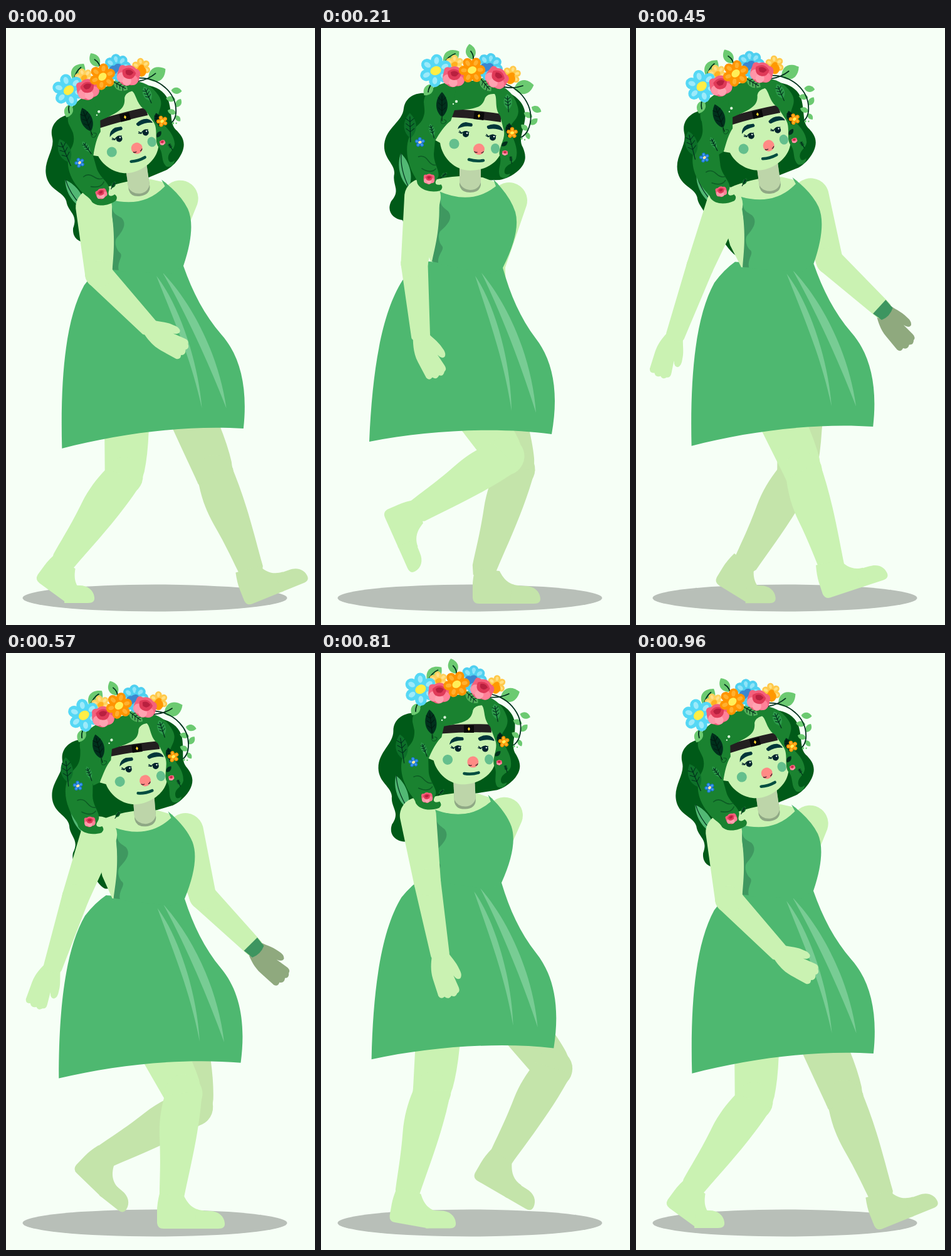
These frames come from a looping animation (493x951 px, 990 ms). An HTML page:

```html
<!DOCTYPE html>
<html lang="en">
<head>
<meta charset="utf-8">
<title>Walking girl</title>
<style>
html, body { margin: 0; width: 100%; height: 100%; overflow: hidden; background: #f6fff6; }
svg { display: block; width: 493px; height: 951px; }
</style>
</head>
<body>
<svg id="stage" viewBox="0 0 493 951"></svg>
<script>
const SKIN = '#caf2b2', FAR_SKIN = '#c4e4aa', DRESS = '#4eb870', SHADE = '#3f9860';
const HAIR = '#1a8230', DEEP = '#005a18', INK = '#00301c', LEAF = '#6cca71';

// ---- shape helpers ----
const path = (d, fill, more = '') => `<path d="${d}" fill="${fill}" ${more}/>`;
const line = (d, color, w) => path(d, 'none', `stroke="${color}" stroke-width="${w}" stroke-linecap="round"`);
const oval = (x, y, rx, ry, fill, a = 0) =>
  `<ellipse cx="${x}" cy="${y}" rx="${rx}" ry="${ry}" fill="${fill}" transform="rotate(${a} ${x} ${y})"/>`;
const dot = (x, y, r, fill) => oval(x, y, r, r, fill);
const at = (x, y, a, body) => `<g transform="translate(${x} ${y}) rotate(${a})">${body}</g>`;
const group = (id, body) => `<g id="${id}">${body}</g>`;

function leaf(x, y, len, a, fill, vein, fat = 0.36) {
  const w = len * fat;
  let s = path(`M0 0C${-w} ${-len * .25} ${-w} ${-len * .7} 0 ${-len}C${w} ${-len * .7} ${w} ${-len * .25} 0 0Z`, fill);
  if (vein) {
    s += line(`M0 ${len * .15}V${-len * .85}`, vein, 1.2);
    for (const k of [.25, .45, .65])
      s += line(`M${-w * .5} ${-len * (k + .13)}L0 ${-len * k}L${w * .5} ${-len * (k + .13)}`, vein, 1);
  }
  return at(x, y, a, s);
}

function flower(x, y, r, n, fill, light, core, a = 0) {
  let s = dot(0, 0, r * .5, fill);
  for (let i = 0; i < n; i++)
    s += at(0, 0, a + i * 360 / n, oval(0, -r * .63, r * .36, r * .38, fill) + oval(0, -r * .62, r * .15, r * .22, light));
  return at(x, y, 0, s + oval(0, 0, r * .34, r * .27, core, -20));
}

const rose = (x, y, r, a) => at(x, y, a, `<g transform="scale(${r / 18})">` +
  path('M-17 -6Q-18 -16 -8 -14Q0 -20 9 -14Q19 -14 18 -3Q20 12 6 14Q-2 19 -9 14Q-20 10 -17 -6Z', '#f4607c') +
  dot(-9, 5, 8, '#ff96a8') + dot(9, 5, 8, '#ff8198') + dot(0, 9, 7, '#ffa3b2') +
  path('M-11 -7Q0 -18 11 -7Q10 5 0 5Q-10 5 -11 -7Z', '#e03a58') +
  path('M-6 -7Q0 -12 7 -7Q4 0 0 -1Q-5 0 -6 -7Z', '#b9203f') + '</g>');

const limb = (len, a, b, fill) =>
  path(`M${-a} 0A${a} ${a} 0 0 1 ${a} 0L${b} ${len}A${b} ${b * .5} 0 0 1 ${-b} ${len}Z`, fill);

// ---- body parts ----
const UPPER = 107, FORE = 117;
const HAND = 'M-13 -2C-18 8 -23 20 -23 34L-23 62Q-21 69 -14 66Q-10 73 -3 68Q2 73 7 67Q13 66 12 58' +
  'L10 38Q13 48 19 46Q24 42 22 32C21 18 14 8 13 -2Z';

const arm = (id, hand, band = '') =>
  group(id + 'Hand', path(HAND, hand)) +
  group(id + 'Fore', limb(FORE, 21.5, 15, SKIN) + at(0, FORE, 0, band)) +
  group(id + 'Upper', limb(UPPER, 29, 21.5, SKIN) + dot(0, UPPER, 21.5, SKIN));

const leg = (id, fill) =>
  group(id + 'Thigh', path('M-30 -5L-27 -62L-22 -150L56 -150L44 -69Q40 -30 33 -5L28 8L-26 8Z', fill) + dot(0, 0, 30.5, fill)) +
  group(id + 'Shin', path('M-30 3C-36 25 -39 45 -38 70C-36 110 -38 140 -38 163L-34 178L-8 178L1 165C10 120 26 60 30 -5Z', fill)) +
  group(id + 'Heel', path('M-60 -56Q-64 -40 -64 -28L-64 -9Q-63 0 -54 0L0 0L10 -29C-8 -30 -16 -42 -21 -52Z', fill)) +
  group(id + 'Toe', path('M-4 0L34 0Q45 0 44 -9C43 -20 34 -28 20 -28L-2 -29Z', fill));

const skirt =
  path('M192 374L165 371Q147 382 130 402C98 452 82 540 77 659C170 641 280 635 368 647' +
    'C380 580 370 530 343 495C318 462 302 425 290 382L240 350Z', DRESS) +
  path('M246 395C277 440 303 530 304 610C292 530 270 470 246 395Z', '#78cc94') +
  path('M256 390C302 445 337 530 343 613C320 540 290 460 256 390Z', '#78cc94');

const torso =
  path('M145 262Q160 240 222 236L258 238L282 247L290 300L200 374L175 372L162 335L156 290Z', SKIN) +
  path('M221 200H255V250Q253 262 238 262Q223 262 221 250Z', '#8fa885') +
  path('M221 200H255V246Q251 258 238 258Q225 257 221 246Z', '#bdd5a9') +
  path('M275 241Q302 268 310 293Q319 325 290 382L270 392L178 374Q190 335 189 300L188 260Q240 283 279 252Z', DRESS) +
  path('M189 262C192 285 191 282 203 292C212 304 200 315 190 324C186 330 188 342 193 347' +
    'C198 353 186 360 187 374L177 372C184 340 190 320 189 262Z', SHADE);

const backHair = path('M182 108C160 98 135 106 132 128C130 150 104 158 101 185C99 208 118 216 117 232' +
  'C113 250 128 258 112 276C104 292 115 304 130 306C136 320 140 345 152 345C165 345 185 300 200 245' +
  'L285 242C295 240 305 236 316 226C330 212 326 200 322 190C314 176 324 165 326 140C326 120 310 105 290 100Z', DEEP) +
  leaf(140, 254, 56, -13, '#52b874', '', .2) + line('M140 254Q126 225 128 200', INK, 1.2);

const eye = (x, y) => oval(x, y, 5, 5, '#00242c') + dot(x + 2, y - 1.5, 1.2, '#fff') +
  line(`M${x + 5} ${y - 3}Q${x - 3} ${y - 6} ${x - 7} ${y - 1}L${x - 11} ${y - 3}M${x - 7} ${y - 2}L${x - 10} ${y - 5}`, '#00242c', 1.3);

const face =
  path('M181 178L190 183C193 206 213 227 238 227C264 227 284 213 288 195L296 160L278 98L215 110L200 145Z', SKIN) +
  dot(212.5, 184.5, 8, '#64bf8d') + oval(278, 192, 7, 8, '#64bf8d') +
  path('M218 161Q221 151 231 150L241 152Q243 156 240 157Q227 155 218 161Z', '#00363a') +
  eye(231, 169) + eye(274, 174.5) +
  dot(252, 193, 9, '#ff8a85') +
  line('M245 197Q247 199 249 198M256 199Q258 199 259 197', '#4a2a30', 1.5) +
  line('M236 209.5Q247 213 259 211', '#004d40', 4.5) +
  path('M211 129Q250 131 288 137L287 150Q248 144 207 142Z', '#231f20') +
  at(252, 140, 7, '<rect x="-8" y="-6" width="16" height="12" fill="#080808"/>' + path('M0 -3L2 0L0 3L-2 0Z', '#ffd92e'));

const cap = path('M164 118C165 95 195 82 240 84C285 82 308 100 314 126C319 146 300 150 302 162' +
  'C306 178 316 190 311 208C306 218 296 216 293 226Q291 236 302 232Q296 243 286 237C280 225 290 215 285 203' +
  'C282 192 294 178 292 165L286 140C276 128 282 112 277 105Q266 104 262 111C258 125 250 128 228 130' +
  'L213 131L207 148C198 154 190 166 181 178L170 180Z', HAIR) +
  path('M265 156Q275 151 284 155Q290 159 290 164Q280 159 267 161Q264 159 265 156Z', '#00363a');

const trim =
  leaf(193, 142, 40, 0, INK, '#001a10', .3) +
  line('M193 140Q188 155 197 152Q203 148 196 146', '#0c5c24', 1.2) +
  leaf(299, 130, 25, -4, '#2c9a4a', INK) + leaf(298, 170, 19, 8, INK, '#001a10') +
  leaf(288, 188, 12, 55, INK) + leaf(304, 214, 11, -10, HAIR, INK) +
  flower(305, 167, 9, 5, '#ff9800', '#ffb338', '#ffee58') + rose(293.5, 199, 4.5, 0) +
  dot(216, 117, 2.2, '#d8f5d8') + dot(211, 121, 1.2, '#d8f5d8') +
  leaf(192, 238, 12, 50, HAIR, INK);

const lock = path('M172 108C160 120 172 140 152 155C134 170 132 195 138 215C142 232 150 238 150 246' +
  'C155 258 172 262 186 259Q192 255 188 249C180 251 176 247 182 240C190 230 175 215 178 197' +
  'L180 180C188 166 197 155 206 147L210 131L215 100Z', HAIR) +
  leaf(141, 174, 40, 0, '#0d7029', INK, .32) +
  leaf(178, 172, 21, -14, '#2c9a4a', INK, .28) +
  line('M153 204Q162 201 168 210T181 218M158 223Q172 232 180 224', '#0c5c24', 1.6) +
  flower(156, 181, 8, 5, '#1e78d8', '#4ba4f0', '#ffe9a0') + rose(169, 240, 9, 0);

const crown =
  leaf(195, 55, 31, 55, LEAF, '', .46) + leaf(241, 50, 25, -10, LEAF, '', .42) +
  leaf(308, 97, 32, 79, LEAF, '', .46) + leaf(178, 90, 22, -142, LEAF, '', .42) +
  leaf(336, 126, 17, 115, LEAF, '', .4) + leaf(337, 142, 15, -62, LEAF, '', .4) +
  leaf(334, 154, 15, 50, LEAF, '', .4) + leaf(330, 163, 14, -50, LEAF, '', .4) +
  leaf(328, 166, 12, 160, LEAF, '', .4) +
  line('M196 56Q204 44 214 41M241 56Q246 46 239 37M180 86Q172 92 171 102M292 94Q308 97 322 92', INK, 1.8) +
  line('M290 88C324 98 344 132 330 163Q326 171 318 175', INK, 1.8) +
  dot(320, 176, 1.8, LEAF) + dot(325, 178, 1.2, LEAF) +
  leaf(254, 80, 27, 140, '#4eae58', INK, .38) +
  flower(213, 58, 15, 6, '#ffd15c', '#ffe08a', '#ffb020') +
  flower(268, 62, 22, 8, '#4fd0f0', '#8fe4f8', '#3b87d0', 12) + dot(261, 63, 7, '#3b87d0') +
  flower(304, 75, 15, 6, '#ffc94a', '#ffdf80', '#ff9800', 14) + dot(302, 81, 8, '#ff9800') +
  flower(183, 68, 26, 6, '#55d8f5', '#9deafa', '#ffee45', 5) +
  rose(212, 78, 18, 8) +
  flower(241, 67, 21, 6, '#ff9400', '#ffb02e', '#ffee58', 28) +
  rose(280, 80, 18, 35);

const inHead = body => `<g transform="translate(-252 -140)">${body}</g>`;
const inBody = body => `<g transform="translate(-290 -382)">${body}</g>`;

document.getElementById('stage').innerHTML =
  oval(237.5, 908, 211, 21.5, '#b8bfb8') +
  group('hair', inHead(backHair)) +
  arm('fa', '#8fa97e', path('M-15 -9L15 -9L13 8Q0 14 -13 8Z', '#3d9560')) +
  leg('fl', FAR_SKIN) + leg('nl', SKIN) +
  group('skirt', inBody(skirt)) + group('torso', inBody(torso)) +
  arm('na', SKIN) +
  group('head', inHead(face + cap + group('lock', lock) + trim + crown));

// ---- motion: each row is a time followed by its pose ----
const CYCLE = 960, STEP = 480;
// waist x y, torso angle, skirt angle, head x y angle
const BODY = [
  [0, 283, 379, -8.2, -3.9, 190, 142, -20.7],
  [90, 285, 391.5, -4.7, -2.5, 209, 152, -14.3],
  [210, 290, 382, 0, 0, 252, 140, 0],
  [330, 288, 366, -2.7, -1.15, 236, 121, -6.9]];
// knee x y, thigh angle, shin angle, ball of foot x y, heel angle, toe angle
const LEG = [
  [0, 188, 714, -.5, 39, 97, 916, 36, 0],
  [90, 231, 720, -10.6, 64.6, 83, 863, 44, 38],
  [210, 294, 682, -37.5, 61.5, 124, 829, 66, 66],
  [330, 303, 657, -41, 34, 229, 863, 30, 30],
  [480, 262, 711, -25, -17.4, 372, 897, -22, -22],
  [570, 283, 702, -30, 10, 305, 917, 0, 0],
  [690, 240, 703, -17.6, 21.3, 231, 917, 0, 0],
  [810, 177, 698, 3, 17.2, 171, 916.5, 10, 0]];
// upper arm, forearm and hand angles
const NEAR_ARM = [
  [0, -4, -43.6, -61], [210, 7, -5, -28], [330, 16, 14, 0], [480, 22, 20, 19],
  [570, 20.5, 18, 20], [690, 9, 7, 16], [810, -8, -10, -18]];
const FAR_ARM = [
  [0, 18, 12, 5], [210, 15, -5, -10], [330, -4.5, -37, -28], [480, -17, -48, -42],
  [570, -15, -45, -48], [690, 8, -31, -47], [810, 20, -5, -20]];
const SWAY = [[0, -2], [210, -1.5], [330, 1.5], [570, 8.5], [690, 1.5], [810, -1.5]];

// smooth looping curve through the rows, without overshoot
function pose(rows, period, time) {
  const n = rows.length, t = time % period;
  let i = n - 1;
  while (rows[i][0] > t) i--;
  const key = (j, c) => rows[(j + n) % n][c] + (c ? 0 : Math.floor(j / n) * period);
  const slope = (j, c) => (key(j + 1, c) - key(j, c)) / (key(j + 1, 0) - key(j, 0));
  const tangent = (j, c) => {
    const a = slope(j - 1, c), b = slope(j, c);
    return a * b > 0 ? 2 * a * b / (a + b) : 0;
  };
  const span = key(i + 1, 0) - key(i, 0), u = (t - key(i, 0)) / span, v = 1 - u;
  return rows[0].slice(1).map((_, k) => {
    const c = k + 1;
    return v * v * (1 + 2 * u) * key(i, c) + u * u * (3 - 2 * u) * key(i + 1, c) +
      span * u * v * (v * tangent(i, c) - u * tangent(i + 1, c));
  });
}

const RAD = Math.PI / 180;
const node = {};
document.querySelectorAll('g[id]').forEach(g => node[g.id] = g);
const place = (id, x, y, a) =>
  node[id].setAttribute('transform', `translate(${x.toFixed(2)} ${y.toFixed(2)}) rotate(${a.toFixed(2)})`);
const reach = ([x, y], len, a) => [x - len * Math.sin(a * RAD), y + len * Math.cos(a * RAD)];

function poseLeg(id, t, kneeDx, footDx, dy) {
  const [kx, ky, thigh, shin, fx, fy, heel, toe] = pose(LEG, CYCLE, t);
  place(id + 'Thigh', kx + kneeDx, ky + dy, thigh - 3);
  place(id + 'Shin', kx + kneeDx, ky + dy, shin - 10);
  place(id + 'Heel', fx + footDx, fy + dy, heel);
  place(id + 'Toe', fx + footDx, fy + dy, toe);
}

function poseArm(id, shoulder, [upper, fore, hand]) {
  const elbow = reach(shoulder, UPPER, upper), wrist = reach(elbow, FORE, fore);
  place(id + 'Upper', ...shoulder, upper);
  place(id + 'Fore', ...elbow, fore);
  place(id + 'Hand', ...wrist, hand);
}

function draw(t) {
  const [wx, wy, lean, swing, hx, hy, tilt] = pose(BODY, STEP, t);
  const cos = Math.cos(lean * RAD), sin = Math.sin(lean * RAD);
  const joint = (x, y) => [wx + x * cos - y * sin, wy + x * sin + y * cos];
  place('skirt', wx, wy, swing);
  place('torso', wx, wy, lean);
  place('head', hx, hy, tilt);
  place('hair', hx, hy, tilt);
  node.lock.setAttribute('transform', `rotate(${pose(SWAY, CYCLE, t)[0].toFixed(2)} 195 110)`);

  const far = (t + STEP) % CYCLE, lift = Math.sin(far / CYCLE * 2 * Math.PI), air = Math.max(0, lift);
  poseLeg('nl', t, 0, 0, 0);
  poseLeg('fl', far, 71 - 4 * air, 71 - 4 * lift, 6 * air);
  poseArm('na', joint(-128, -113), pose(NEAR_ARM, CYCLE, t));
  poseArm('fa', joint(10, -107), pose(FAR_ARM, CYCLE, t));
}

const LOOP = 990, TICK = 30, start = performance.now();
function run() {
  const t = (performance.now() - start) % LOOP;
  draw(Math.floor(t / TICK) * TICK % CYCLE);
  requestAnimationFrame(run);
}
run();
</script>
</body>
</html>
```
